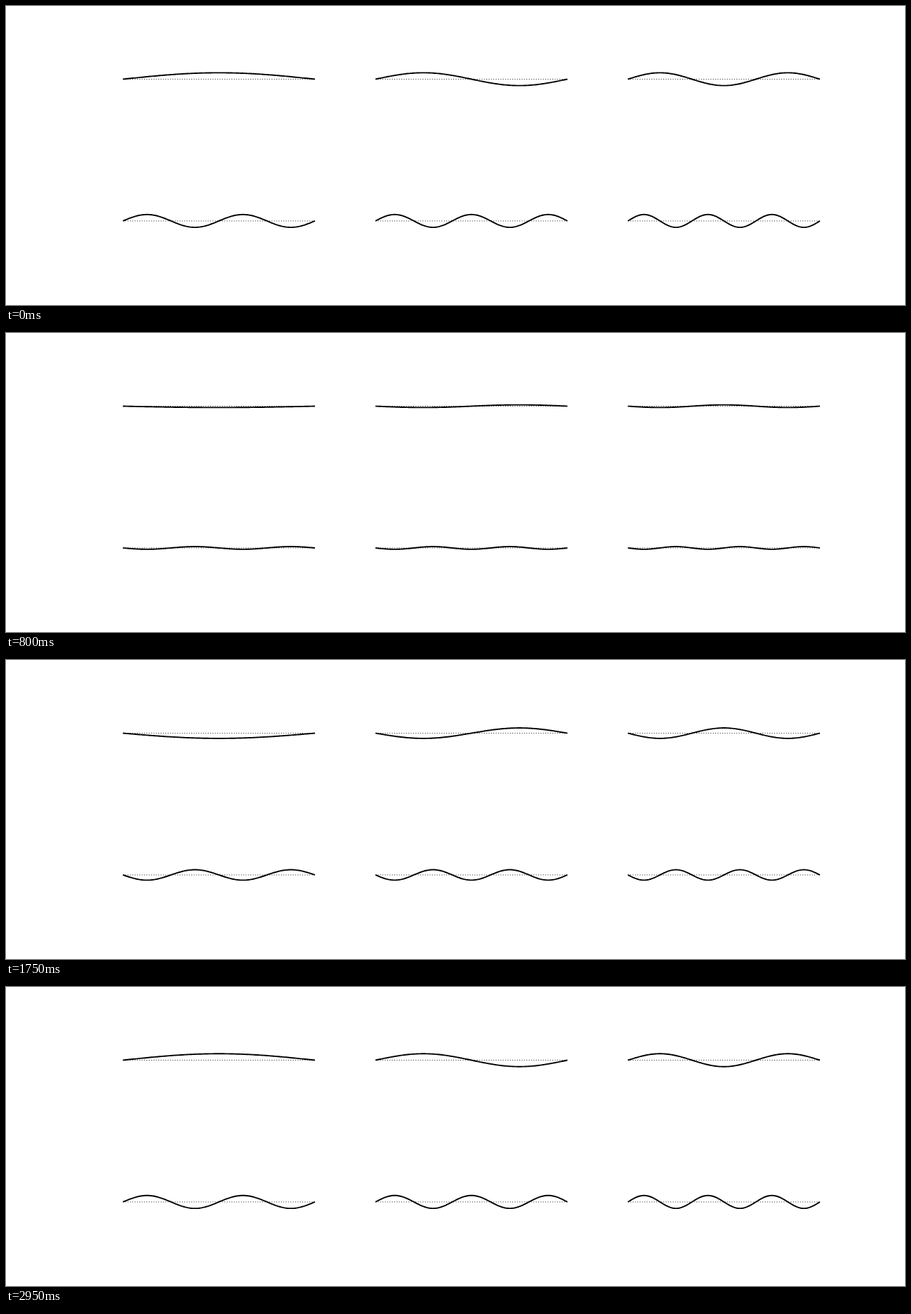
An HTML page that plays this animation: 1280x427 px, repeating every 3 s.

```html
<!DOCTYPE html>
<html lang="en">
<head>
<meta charset="utf-8">
<title>Standing waves</title>
<style>
  html, body { margin: 0; width: 100%; height: 100%; overflow: hidden; background: #fff; }
  svg { display: block; width: 100%; height: 100%; }
  path { fill: none; stroke: #000; }
  .axis { stroke-width: 0.96; stroke-dasharray: 0.96 2.4; }
  .wave { stroke-width: 1.92; }
</style>
</head>
<body>
<svg id="stage" viewBox="0 0 1280 427"></svg>
<script>
const LOOP = 3000, STEP = 50, STEPS = LOOP / STEP;
const LEFT = 166.6, GAP = 359.5, WIDTH = 273.2;
const ROWS = [104.5, 306.95];
const AMPLITUDE = 9.2, SAMPLES = 120;
const stage = document.getElementById('stage');

function addPath(cls) {
  const path = document.createElementNS('http://www.w3.org/2000/svg', 'path');
  path.setAttribute('class', cls);
  return stage.appendChild(path);
}

const strings = Array.from({ length: 6 }, (_, i) => {
  const x = LEFT + GAP * (i % 3);
  const y = ROWS[Math.floor(i / 3)];
  addPath('axis').setAttribute('d', `M${x} ${y}h${WIDTH}`);
  return { x, y, mode: i + 1, path: addPath('wave') };
});

function wavePath({ x, y, mode }, height) {
  const points = [];
  for (let i = 0; i <= SAMPLES; i++) {
    const u = i / SAMPLES;
    const py = y - height * Math.sin(mode * Math.PI * u);
    points.push(`${(x + WIDTH * u).toFixed(3)} ${py.toFixed(3)}`);
  }
  return 'M' + points.join('L');
}

// The swing advances in 50 ms steps and peaks on the last one.
function draw(time) {
  const step = Math.floor((time % LOOP) / STEP);
  const height = AMPLITUDE * Math.cos(2 * Math.PI * (step + 1) / STEPS);
  for (const s of strings) s.path.setAttribute('d', wavePath(s, height));
}

const start = performance.now();
function tick() {
  draw(performance.now() - start);
  requestAnimationFrame(tick);
}
tick();
</script>
</body>
</html>
```
